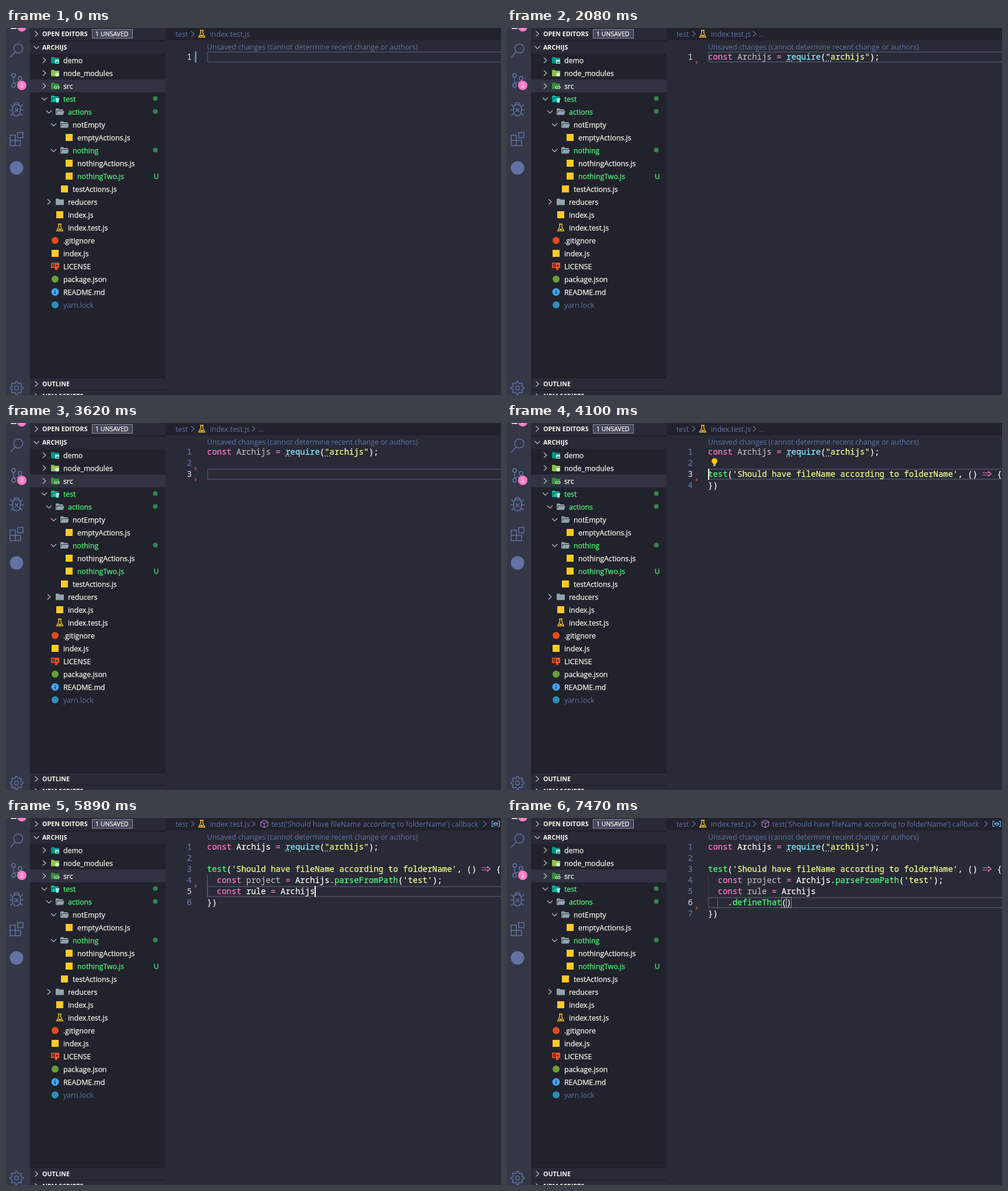
An HTML page that plays this animation: 847x627 px, repeating every 8 s.

```html
<!DOCTYPE html>
<html lang="en">
<head>
<meta charset="utf-8">
<title>Editor</title>
<style>
  html, body { margin: 0; width: 100%; height: 100%; overflow: hidden; background: #282a36; }
  svg { display: block; width: 847px; height: 627px; }
  text {
    font: 12.3px "Open Sans", "Noto Sans", sans-serif; white-space: pre;
    color: #f8f8f2; fill: currentColor; stroke: currentColor; stroke-width: .25px;
  }
  tspan { fill: currentColor; stroke: currentColor; }
  .head { font-size: 10.7px; font-weight: 700; stroke: none; }
  .small { font-size: 10.6px; }
  .mute { color: #6272a4; stroke: none; }
  .green { color: #50fa7b; }
  .status { color: #44c46b; font-weight: 600; }
  .code { font: 13.98px "Noto Sans Mono", monospace; }
  .num { text-anchor: end; color: #6272a4; }
  .num.on { color: #c6c6c6; }
  .key { color: #ff79c6; }
  .str { color: #f1fa8c; }
  .lib { color: #8be9fd; }
  .fade { color: #b3b3b3; }
  .line { fill: none; stroke: #6272a4; stroke-width: 1.5; }
</style>
</head>
<body>
<svg id="stage" xmlns="http://www.w3.org/2000/svg" width="847" height="627">
  <rect width="847" height="627" fill="#282a36"/>
  <rect x="273" width="574" height="21" fill="#21222c"/>
  <rect width="41" height="627" fill="#343746"/>
  <rect x="41" width="232" height="627" fill="#21222c"/>
  <g id="bar"></g>
  <g id="side"></g>
  <g id="editor"></g>
</svg>
<script>
const $ = id => document.getElementById(id);
const text = (x, y, s, cls = '') => `<text x="${x}" y="${y}" class="${cls}">${s}</text>`;
const rect = (x, y, w, h, fill) => `<rect x="${x}" y="${y}" width="${w}" height="${h}" fill="${fill}"/>`;
const dot = (x, y, r, fill) => `<circle cx="${x}" cy="${y}" r="${r}" fill="${fill}"/>`;
const fill = (d, color) => `<path d="${d}" fill="${color}"/>`;
const line = (d, color = '#6272a4', w = 1.5) =>
  `<path d="${d}" class="line" style="stroke:${color};stroke-width:${w}"/>`;
const ring = (x, y, r) => `<circle cx="${x}" cy="${y}" r="${r}" class="line"/>`;
const chevron = (x, y, open, color = '#c5c5c5') => line(open
  ? `M${x - 4.5} ${y - 2}l4.5 4.5 4.5-4.5` : `M${x - 2.5} ${y - 4.5}l5 4.5-5 4.5`, color, 1.1);

// Activity bar
function gear(x, y) {
  let d = '';
  for (let i = 0; i < 32; i++) {
    const r = i % 4 < 2 ? 11.3 : 8.3, a = (i - .5) * Math.PI / 16;
    d += `${i ? 'L' : 'M'}${(x + r * Math.cos(a)).toFixed(1)} ${(y + r * Math.sin(a)).toFixed(1)}`;
  }
  return line(d + 'Z') + ring(x, y, 3.5);
}

$('bar').innerHTML =
  rect(8, 0, 10, 1.5, '#f8f8f2') + dot(27, -2, 8, '#ff79c6') + rect(26.4, 0, 1.2, 2, '#f8f8f2') +
  ring(21, 35, 7.8) + line('M15.5 41L7.5 50') +
  ring(13, 81, 3.2) + ring(13, 98, 3.2) + ring(24, 86, 3.2) + line('M13 84.5V94.5M24 89.5C24 93 18 92 14 94') +
  dot(27, 98, 8, '#ff79c6') + `<text x="27" y="101.3" text-anchor="middle" style="font-size:9px">2</text>` +
  line('M11.5 136C11.5 132 14 131 18 131S24.5 132 24.5 136V142C24.5 147 22 150 18 150S11.5 147 11.5 142Z') +
  line('M13.5 131.5C13.5 126 22.5 126 22.5 131.5M11.5 135L7.5 130.5M24.5 135L28.5 130.5M11.5 140H6M24.5 140H30M12 145L7.5 149.5M24 145L28.5 149.5M15 137.5l6 6M21 137.5l-6 6') +
  line('M7 183H16V192H25V201H7ZM7 192H16V201M20 178.5H29V187.5H20Z') +
  dot(18, 239, 11.5, '#6272a4') + gear(18, 615);

// Explorer
const flask = (x, y) => line(`M${x - 3} ${y - 6}h6M${x - 1.8} ${y - 6}v4.5L${x - 5.3} ${y + 5.5}h10.6L${x + 1.8} ${y - 1.5}v-4.5`, '#ffca28', 1.3) +
  fill(`M${x - 3} ${y + 4}l2-2.8 1.3 1 .9-.8 1.8 2.6z`, '#ffca28');
const folder = (x, y, c) => fill(`M${x - 7} ${y - 4.5}q0-1 1-1h4l1.5 1.5h6.5q1 0 1 1v7.5q0 1-1 1h-12q-1 0-1-1z`, c);
const opened = (x, y, c) => fill(`M${x - 7} ${y - 4.5}q0-1 1-1h4l1.5 1.5h5.5q1 0 1 1v1H${x - 4.5}L${x - 5.6} ${y + 2}V${y - 2.5}H${x - 6}V${y + 4}L${x - 4} ${y - 1.2}H${x + 7.7}L${x + 6} ${y + 4.7}q-.3.8-1 .8H${x - 6}q-1 0-1-1z`, c);
const icons = {
  demo: (x, y) => folder(x, y, '#009688') + rect(x, y - 1, 7, 7, '#b2dfdb') + fill(`M${x + 1} ${y + 5}l2-3 1 1 1-1.5 1.5 3.5z`, '#009688'),
  mods: (x, y) => folder(x, y, '#8bc34a') + dot(x + 3.5, y + 2.5, 3.3, '#dcedc8'),
  src: (x, y) => folder(x, y, '#388e3c') + line(`M${x + 1} ${y}l-2.5 2.5 2.5 2.5M${x + 5} ${y}l2.5 2.5-2.5 2.5M${x + 3.8} ${y}l-1.6 5`, '#c8e6c9', 1.1),
  test: (x, y) => opened(x, y, '#00bfa5') + rect(x + 1, y - 1, 6, 1.5, '#d8fff6') + rect(x + 2, y, 4, 6.5, '#a7ffeb'),
  open: (x, y) => opened(x, y, '#90a4ae'),
  shut: (x, y) => folder(x, y, '#90a4ae'),
  js: (x, y) => rect(x - 6, y - 6, 12, 12, '#ffca28'),
  flask,
  git: (x, y) => dot(x, y, 6, '#e64a19'),
  cert: (x, y) => fill(`M${x - 7} ${y - 6}h14v9h-3v4l-2-1.3-2 1.3v-4h-7zM${x - 5.5} ${y - 4.5}v6h5v-6z`, '#ff5722') +
    rect(x - 5, y - 3, 4, 1.2, '#ff5722') + rect(x - 5, y - .5, 3, 1.2, '#ff5722') + dot(x + 3, y - 1, 1.6, '#21222c'),
  node: (x, y) => dot(x, y, 6, '#689f38'),
  info: (x, y) => dot(x, y, 6.5, '#42a5f5') + rect(x - .7, y - 1, 1.4, 4.5, '#21222c') + rect(x - .7, y - 3.6, 1.4, 1.4, '#21222c'),
  yarn: (x, y) => dot(x, y, 6, '#2c8ebb')
};

// [name, depth, icon, arrow: 1 closed 2 open, class, status]
const tree = [
  ['demo', 0, 'demo', 1], ['node_modules', 0, 'mods', 1], ['src', 0, 'src', 1],
  ['test', 0, 'test', 2, 'green', 1], ['actions', 1, 'open', 2, 'green', 1],
  ['notEmpty', 2, 'open', 2], ['emptyActions.js', 3, 'js'],
  ['nothing', 2, 'open', 2, 'green', 1], ['nothingActions.js', 3, 'js'],
  ['nothingTwo.js', 3, 'js', 0, 'green', 'U'], ['testActions.js', 2, 'js'],
  ['reducers', 1, 'shut', 1], ['index.js', 1, 'js'], ['index.test.js', 1, 'flask'],
  ['.gitignore', 0, 'git'], ['index.js', 0, 'js'], ['LICENSE', 0, 'cert'],
  ['package.json', 0, 'node'], ['README.md', 0, 'info'], ['yarn.lock', 0, 'yarn', 0, 'mute']
];
const header = (y, name, open) => rect(41, y, 232, 22, '#282a36') + rect(41, y, 232, 1, '#191a21') +
  chevron(52, y + 11, open) + text(62, y + 14.8, name, 'head');

$('side').innerHTML = header(-1, 'OPEN EDITORS') +
  `<rect x="147.5" y="2.5" width="69" height="15" fill="#44475a" stroke="#8b8d98"/>` +
  text(153, 14, '1 UNSAVED', 'small') + header(22, 'ARCHIJS', true) +
  header(597, 'OUTLINE') + header(618, 'NPM SCRIPTS') + rect(41, 88, 232, 22, '#313341') +
  tree.map(([name, depth, icon, arrow, cls, status], i) => {
    const x = 98 + depth * 8, y = 55 + i * 22;
    return (arrow ? chevron(x - 32.5, y, arrow > 1) : '') + icons[icon](x - 14, y) + text(x, y + 4.8, name, cls) +
      (status === 1 ? dot(255.5, y - .5, 4, '#38824e') : status ? text(252.5, y + 4.6, status, 'status') : '');
  }).join('');

// Editor: each step changes part of the state
const head = 'const Archijs = require("archijs");';
const open = "test('Should have fileName according to folderName', () => {";
const body = "  const project = Archijs.parseFromPath('test');";
const rule = '  const rule = Archijs';
const steps = [
  [0, { top: 40, lens: 1, crumb: 0, code: [''], row: 1, col: 0, caret: 0, bar: 1, marks: [], fade: [], hints: 0, bulb: 0, match: 0 }],
  [1240, { caret: 1 }],
  [1620, { top: 21, lens: 0, code: [head], col: 35 }],
  [1790, { bar: 0, marks: [1] }],
  [1940, { crumb: 1 }],
  [2010, { top: 40, lens: 1 }],
  [2080, { caret: 0, fade: ['Archijs'], hints: 1 }],
  [2540, { code: [head, ''], row: 2, col: 0, caret: 1, marks: [1, 2] }],
  [2700, { marks: [2] }],
  [3000, { caret: 0 }],
  [3160, { code: [head, '', ''], row: 3, caret: 1, marks: [2, 3] }],
  [3620, { caret: 0 }],
  [3770, { code: [head, '', open, '})'], caret: 1 }],
  [3860, { marks: [2, 4] }],
  [4010, { marks: [3] }],
  [4100, { bulb: 1 }],
  [4330, { caret: 0 }],
  [4800, { code: [head, '', open, body, '})'], row: 4, col: 30, caret: 1 }],
  [4960, { crumb: 2 }],
  [5030, { bulb: 0, marks: [4] }],
  [5110, { fade: ['project'] }],
  [5260, { caret: 0 }],
  [5740, { caret: 1 }],
  [5890, { code: [head, '', open, body, rule, '})'], row: 5, col: 22 }],
  [6130, { marks: [5] }],
  [6280, { fade: ['project', 'rule'] }],
  [6360, { caret: 0 }],
  [6910, { code: [head, '', open, body, rule, '    .defineThat()', '})'], row: 6, col: 17, caret: 1 }],
  [6990, { match: 1 }],
  [7150, { marks: [6] }],
  [7470, { caret: 0 }]
];
const LOOP = 8000, LEFT = 344, CHAR = 8.39, ROW = 19;
const colX = c => Math.floor(LEFT + c * CHAR);
const indent = s => s.search(/\S|$/) / 2;

function paint(src, fade) {
  let last = '';
  return src.replace(/'[^']*'|"[^"]*"|=>|=|\w+|[^\w\s]/g, (t, at) => {
    let cls = '';
    if (/^['"]/.test(t)) cls = 'str';
    else if (t === 'const' || t[0] === '=') cls = 'key';
    else if (t === 'require') cls = 'lib';
    else if (/^\w/.test(t) && src[at + t.length] === '(') cls = 'green';
    else if (last === 'const' && fade.includes(t)) cls = 'fade';
    last = t;
    return `<tspan class="${cls}">${t === '=>' ? '  ' : t}</tspan>`;
  });
}

function arrow(col, y) {
  const x = colX(col);
  return line(`M${x + 1} ${y - 2}h12M${x + 1} ${y + 2}h12M${x + 10} ${y - 4.5}l5.5 4.5-5.5 4.5`, '#ff79c6', 1.2);
}

function crumbs(level) {
  const sep = x => chevron(x, 10, false, '#6272a4');
  let out = text(290, 14.8, 'test', 'mute') + sep(319.5) + flask(335, 10) + text(349, 14.8, 'index.test.js', 'mute');
  if (level) out += sep(423.5);
  if (level === 1) out += text(431, 14.8, '...', 'mute');
  if (level === 2) out +=
    line('M442 3.5l6 3v7l-6 3-6-3v-7zM436 6.5l6 3 6-3M442 9.5v7', '#b180d7', 1.1) +
    text(454, 14.8, "test('Should have fileName according to folderName') callback", 'mute') +
    sep(819.5) + line('M834.5 5.5h-3v9h3M841.5 5.5h3v9h-3M838 7.5l3.5 1.5v2.5l-3.5 1.5-3.5-1.5v-2.5zM834.5 9l3.5 1.5 3.5-1.5', '#75beff', 1.1);
  return out;
}

function draw(s) {
  const rowY = r => s.top + (r - 1) * ROW, y = rowY(s.row);
  const depth = indent(s.code[s.row - 1]);
  let out = crumbs(s.crumb);
  if (s.lens) out += text(LEFT, 36.8, 'Unsaved changes (cannot determine recent change or authors)', 'mute');
  out += `<rect x="345" y="${y + 1}" width="520" height="17" fill="none" stroke="#44475a" stroke-width="2"/>`;
  s.code.forEach((src, i) => {
    const top = rowY(i + 1), base = top + 14;
    for (let k = 1; k <= indent(src); k++)
      out += rect(colX(k * 2 - 2), top, 1, ROW, k === depth ? '#626470' : '#3e404a');
    out += text(318, base, i + 1, 'code num' + (i + 1 === s.row ? ' on' : '')) +
      text(LEFT, base, paint(src, s.fade), 'code');
    if (src.includes('=>')) out += arrow(src.indexOf('=>'), base - 5);
  });
  if (s.bar) out += rect(323, y, 3, ROW, '#5a8b9c');
  for (const m of s.marks) out += fill(`M323 ${rowY(m + 1) - 4}l4 4-4 4z`, '#94404a');
  if (s.hints) for (const c of [16, 24]) for (let k = 0; k < 3; k++)
    out += rect(colX(c) + k * 4, 55.5, 2, 1.8, '#a5a6a8');
  if (s.bulb) out += dot(355, 65, 4.8, '#ffcc00') + rect(353, 68, 4, 3, '#ffcc00') + rect(353, 71.5, 4, 2, '#d0d0d0');
  if (s.match) for (const c of [15, 16])
    out += `<rect x="${colX(c) + .5}" y="${y + .5}" width="8" height="18" fill="none" stroke="#888"/>`;
  if (s.caret) out += rect(colX(s.col), y, 2, ROW, '#f8f8f2');
  return out;
}

let shown = -1;
function tick() {
  const t = performance.now() % LOOP;
  const n = steps.filter(([at]) => at <= t).length;
  if (n !== shown) {
    shown = n;
    $('editor').innerHTML = draw(Object.assign({}, ...steps.slice(0, n).map(p => p[1])));
  }
  requestAnimationFrame(tick);
}
tick();
</script>
</body>
</html>
```
